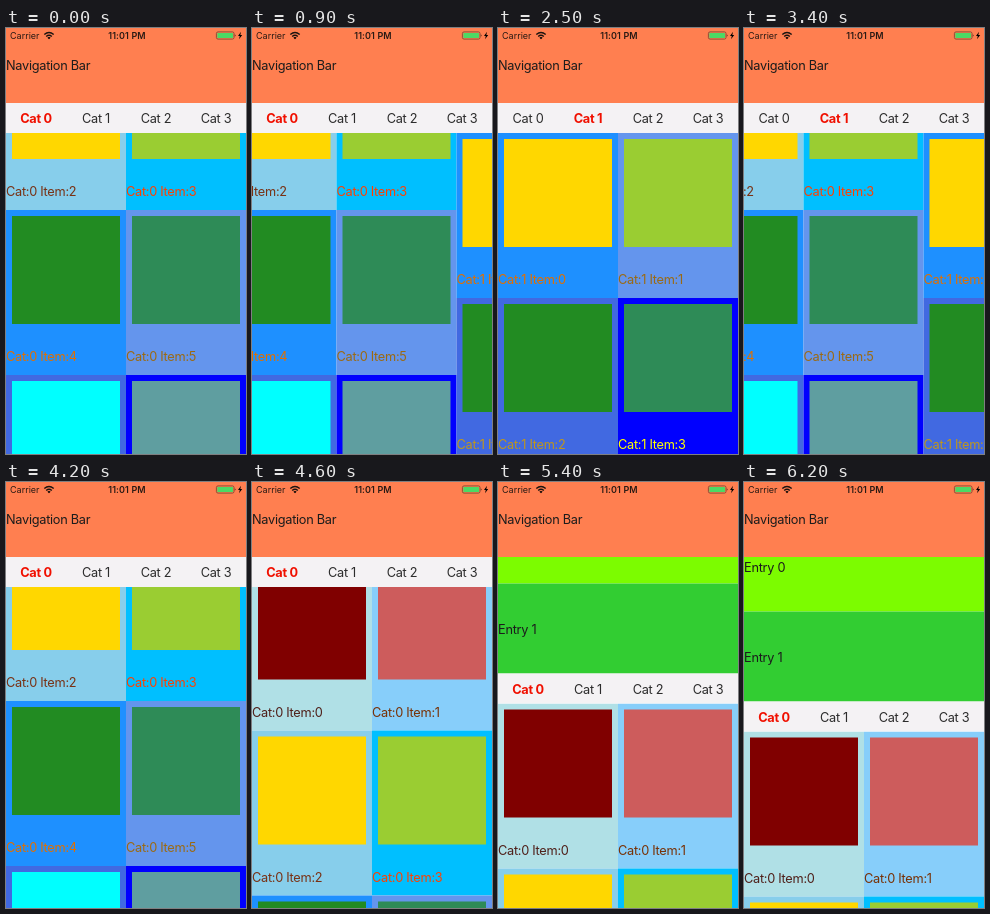
Write an HTML page that moves like this. It is 240 px wide and 426 px high and loops after 6.3 s.

```html
<!DOCTYPE html>
<html lang="en">
<head>
<meta charset="utf-8">
<title>Category pager</title>
<style>
  html, body { margin: 0; width: 100%; height: 100%; overflow: hidden; }
  body { position: relative; font: 12.75px/1 Inter, Roboto, sans-serif; letter-spacing: -.28px; color: #1c1c1c; background: #fff; white-space: nowrap; }
  div, span, svg { position: absolute; }
  .row { left: 0; width: 240px; display: flex; align-items: center; }
  .row span { padding-top: 2px; }
  #nav { top: 0; height: 75px; background: #ff7f50; }
  #sheet { left: 0; top: 75px; width: 240px; height: 351px; overflow: hidden; }
  #body { left: 0; top: 0; width: 240px; height: 351px; }
  .entry { height: 90px; }
  #tabs { top: 0; height: 30px; background: #f4f2f4; color: #2c2c2c; }
  #tabs span { width: 60px; text-align: center; }
  #tabs .on { color: #f01000; font-weight: 700; }
  #view { left: 0; top: 30px; width: 240px; height: 351px; overflow: hidden; }
  .page { top: 0; width: 240px; height: 660px; }
  .tile { width: 120px; height: 165px; }
  .tile div { left: 6px; top: 6px; width: 108px; height: 108px; }
  .tile span { left: 0; top: 126.5px; line-height: 39px; }
  #status { left: 0; top: 0; }
  #status text { font: 9px Inter, Roboto, sans-serif; letter-spacing: 0; fill: #2a1a14; }
  #status .time { font-weight: 600; letter-spacing: .1px; text-anchor: middle; }
</style>
</head>
<body>
<div id="sheet">
  <div id="body">
    <div class="row entry" style="top:-180px;background:#7cfc00"><span>Entry 0</span></div>
    <div class="row entry" style="top:-90px;background:#32cd32"><span>Entry 1</span></div>
    <div id="tabs" class="row"></div>
    <div id="view"></div>
  </div>
</div>
<div id="nav" class="row"><span>Navigation Bar</span></div>
<svg id="status" width="240" height="16">
  <text x="4" y="11">Carrier</text>
  <g fill="none" stroke="#1c1410" stroke-width="1.4">
    <path d="M38.3 6.6Q43 2.4 47.7 6.6M40.2 8.5Q43 6 45.8 8.5"/>
  </g>
  <path d="M41.4 9.7Q43 8.5 44.6 9.7L43 11.3Z"/>
  <text class="time" x="121" y="11">11:01 PM</text>
  <rect x="210.4" y="3.9" width="17.6" height="7.2" rx="1.6" fill="none" stroke="#5a4030" stroke-width=".7"/>
  <rect x="211.4" y="4.9" width="15.6" height="5.2" rx=".7" fill="#4cd964"/>
  <path d="M228.9 6.2q1.2 1.2 0 2.6z"/>
  <path d="M235 3.8L232 8h1.8l-.8 3.3L236.2 7h-1.9z"/>
</svg>
<script>
const LOOP = 6300, STEP = 100, WIDTH = 240, START_SCROLL = 253;
const PAGES = [
  [['b0e0e6', '800000'], ['87cefa', 'cd5c5c'], ['87ceeb', 'ffd700'], ['00bfff', '9acd32'],
   ['1e90ff', '228b22'], ['6495ed', '2e8b57'], ['4169e1', '00ffff'], ['0000ff', '5f9ea0']],
  [['1e90ff', 'ffd700'], ['6495ed', '9acd32'], ['4169e1', '228b22'], ['0000ff', '2e8b57']]
];

function add(parent, tag, style, text = '') {
  const el = document.createElement(tag);
  Object.assign(el.style, style);
  el.textContent = text;
  parent.append(el);
  return el;
}

const byId = id => document.getElementById(id);
const invert = hex => '#' + (0xffffff - parseInt(hex, 16)).toString(16).padStart(6, '0');
const tabs = [0, 1, 2, 3].map(i => add(byId('tabs'), 'span', { left: i * 60 + 'px' }, 'Cat ' + i));

const pages = PAGES.map((tiles, cat) => {
  const page = add(byId('view'), 'div', {});
  page.className = 'page';
  tiles.forEach(([back, square], i) => {
    const tile = add(page, 'div', {
      left: i % 2 * 120 + 'px', top: (i >> 1) * 165 + 'px', background: '#' + back
    });
    tile.className = 'tile';
    add(tile, 'div', { background: '#' + square });
    add(tile, 'span', { color: invert(back) }, `Cat:${cat} Item:${i}`);
  });
  return page;
});

function smooth(t, from, to) {
  const p = Math.min(1, Math.max(0, (t - from) / (to - from)));
  return p * p * (3 - 2 * p);
}

// Finger drag with a short hold, then a critically damped spring to the next page.
function swipe(t, start, release, dragged) {
  if (t <= release) return dragged * smooth(t, start, release - 100);
  const k = (t - release) / 100;
  return WIDTH - (WIDTH - dragged) * (1 + k) * Math.exp(-k);
}

// Accelerating pull, then a fling slowing by 0.998 per millisecond.
function pull(t) {
  const start = 4020, release = 4300, total = 404.5;
  const fling = at => total - 173 * 0.998 ** (at - 4600);
  if (t >= release) return fling(t);
  const p = Math.max(0, (t - start) / (release - start));
  return fling(release) * p * p;
}

const snap = v => Math.round(v * 2) / 2;
const move = (el, x, y) => {
  el.style.transform = `translate(${snap(x)}px, ${snap(y)}px)`;
};

function draw(t) {
  const x = t < 2600 ? swipe(t, 650, 1500, 137.4) : WIDTH - swipe(t, 2740, 3300, 158);
  const pulled = pull(t);
  move(pages[0], -x, Math.min(0, pulled - START_SCROLL));
  move(pages[1], WIDTH - x, 0);
  move(byId('body'), 0, Math.max(0, pulled - START_SCROLL));
  const active = t >= 2500 && t < 4100 ? 1 : 0;
  tabs.forEach((tab, i) => tab.classList.toggle('on', i === active));
}

const began = performance.now();
function tick() {
  const t = (performance.now() - began) % LOOP;
  draw(Math.floor(t / STEP) * STEP);
  requestAnimationFrame(tick);
}
tick();
</script>
</body>
</html>
```
